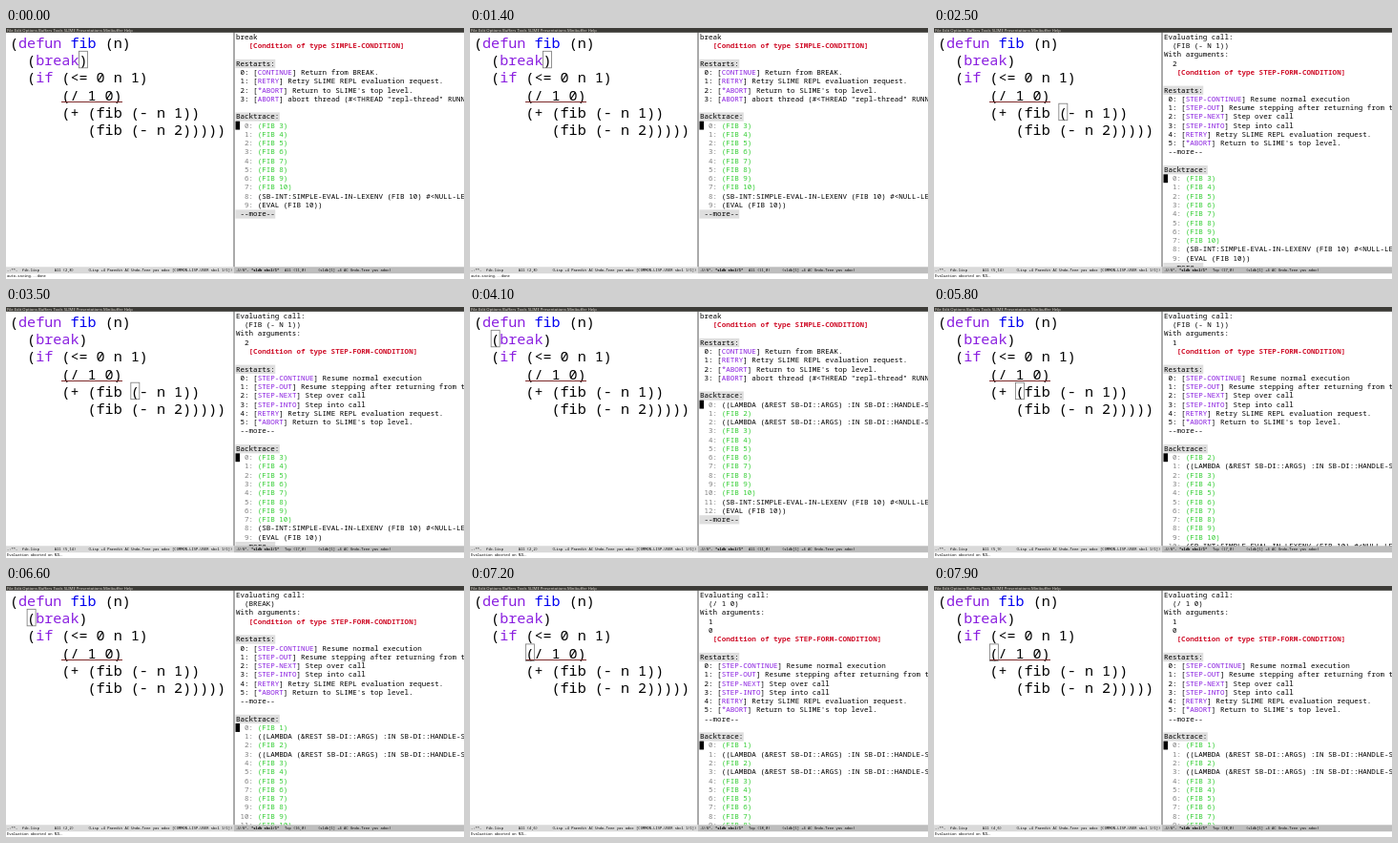
Write an HTML page that moves like this. It is 480 by 263 pixels and loops after 8000 ms.

```html
<!DOCTYPE html>
<html lang="en">
<head>
<meta charset="utf-8">
<title>Stepping through fib</title>
<style>
  html, body { margin: 0; width: 100%; height: 100%; overflow: hidden; background: #fff; }
  svg { display: block; width: 100%; height: 100%; }
  text { font-family: "Noto Sans Mono", "DejaVu Sans Mono", monospace; white-space: pre; fill: #000; }
  .code { font-size: 15.1px; }
  .debug { font-size: 7.55px; }
  .tiny { font-size: 3.78px; }
  .menu { font-family: "Noto Sans", sans-serif; font-size: 4.2px; fill: #dfdbd2; }
  .key { fill: #8a1fe0; }
  .name { fill: #0000f0; }
  .error { fill: #d0102a; font-weight: bold; }
  .num { fill: #7f7f7f; }
  .call { fill: #32cd32; }
</style>
</head>
<body>
<svg id="stage" viewBox="0 0 480 263" preserveAspectRatio="none"></svg>
<script>
const stage = document.getElementById('stage');
const CODE_W = 9.06, CODE_H = 18.3, ROW_H = 9.27, TOP = 5, SPLIT = 240.5;

const esc = s => s.replace(/&/g, '&amp;').replace(/</g, '&lt;');
const span = (cls, s) => `<tspan class="${cls}">${esc(s)}</tspan>`;
const text = (cls, x, y, html) => `<text class="${cls}" x="${x}" y="${y}">${html}</text>`;
const rect = (x, y, w, h, fill) => `<rect x="${x}" y="${y}" width="${w}" height="${h}" fill="${fill}"/>`;

const code = [
  '(' + span('key', 'defun') + ' ' + span('name', 'fib') + ' (n)',
  '  (' + span('key', 'break') + ')',
  '  (' + span('key', 'if') + esc(' (<= 0 n 1)'),
  '      (/ 1 0)',
  '      (+ (fib (- n 1))',
  '         (fib (- n 2)))))'
];

const breakRestarts = [
  ['CONTINUE', 'Return from BREAK.'],
  ['RETRY', 'Retry SLIME REPL evaluation request.'],
  ['*ABORT', "Return to SLIME's top level."],
  ['ABORT', 'abort thread (#<THREAD "repl-thread" RUNNING']
];
const stepRestarts = [
  ['STEP-CONTINUE', 'Resume normal execution'],
  ['STEP-OUT', 'Resume stepping after returning from this'],
  ['STEP-NEXT', 'Step over call'],
  ['STEP-INTO', 'Step into call'],
  ['RETRY', 'Retry SLIME REPL evaluation request.'],
  ['*ABORT', "Return to SLIME's top level."]
];

const LAMBDA = '((LAMBDA (&REST SB-DI::ARGS) :IN SB-DI::HANDLE-SINGLE';
const fibs = Array.from({ length: 8 }, (_, i) => `(FIB ${i + 3})`);
const outer = [...fibs, '(SB-INT:SIMPLE-EVAL-IN-LEXENV (FIB 10) #<NULL-LEXENV', '(EVAL (FIB 10))'];
const inFib2 = ['(FIB 2)', LAMBDA, ...outer];
const inFib1 = ['(FIB 1)', LAMBDA, ...inFib2];

// at: line and column of the cursor; no call while stopped at the break form
const scenes = [
  { from: 0, at: [2, 8], stack: outer, note: 'auto-saving...done' },
  { from: 2500, at: [5, 14], call: '(FIB (- N 1))', args: [2], stack: outer },
  { from: 4100, at: [2, 2], stack: [LAMBDA, ...inFib2] },
  { from: 5300, at: [5, 9], call: '(FIB (- N 1))', args: [1], stack: inFib2 },
  { from: 6200, at: [2, 2], call: '(BREAK)', args: [], stack: inFib1 },
  { from: 7200, at: [4, 6], call: '(/ 1 0)', args: [1, 0], stack: inFib1 }
];

function debuggerPane({ call, args, stack }) {
  const rows = [], marks = [];
  const condition = type => span('error', `   [Condition of type ${type}]`);
  const mark = s => { marks.push([rows.length, s.length]); rows.push(s); };

  if (call) {
    rows.push('Evaluating call:', '  ' + esc(call), 'With arguments:',
      ...args.map(a => '  ' + a), condition('STEP-FORM-CONDITION'));
  } else {
    rows.push('break', condition('SIMPLE-CONDITION'));
  }
  rows.push('');
  mark('Restarts:');
  (call ? stepRestarts : breakRestarts).forEach(([name, about], i) =>
    rows.push(` ${i}: [${span('key', name)}] ${esc(about)}`));
  if (call) rows.push(' --more--');
  rows.push('');
  mark('Backtrace:');
  const point = rows.length;
  stack.forEach((s, i) => rows.push(
    span('num', String(i).padStart(3) + ':') + ' ' + span(s.startsWith('(FIB') ? 'call' : '', s)));
  mark(' --more--');

  const top = n => TOP + n * ROW_H;
  const svg = marks.map(([n, len]) => rect(SPLIT, top(n), len * 4.53 + 1, ROW_H, '#dedede')).join('')
    + rows.slice(0, 27).map((r, n) => text('debug', 241, top(n) + 6.9, r)).join('')
    + rect(SPLIT, top(point), 4.6, ROW_H - .4, '#000');
  return { svg, line: point + 1, fits: rows.length < 27 };
}

function draw(scene) {
  const pane = debuggerPane(scene);
  const [line, col] = scene.at;
  const underY = TOP + 4 * CODE_H - 1.2;
  stage.innerHTML =
    rect(0, 0, 480, 263, '#fff')
    + code.map((c, i) => text('code', 4, 20.7 + i * CODE_H, c)).join('')
    + rect(58, underY, 64, 1, '#7c2929')
    + `<rect x="${4 + col * CODE_W}" y="${TOP + (line - 1) * CODE_H + 1}" width="9" height="17.5" fill="none" stroke="#777" stroke-width=".8"/>`
    + pane.svg
    + rect(238, 4.5, 2, 246, '#aaa')
    + rect(0, 0, 480, 4.8, '#3c3b37')
    + text('menu', 1, 3.8, 'File Edit Options Buffers Tools SLIME Presentations Minibuffer Help')
    + rect(0, 250.3, 239, 7.2, '#d9d9d9')
    + rect(239, 250.3, 241, 7.2, '#bdbdbd')
    + text('tiny', 1, 255.4, `-:**-  fib.lisp       All (${line},${col})`)
    + text('tiny', 86, 255.4, '(Lisp +4 Paredit AC Undo-Tree yas adoc [COMMON-LISP-USER sbcl 1/1])')
    + text('tiny', 241, 255.4, '-U:%*-')
    + `<g font-weight="bold">${text('tiny', 257, 255.4, '*sldb sbcl/1*')}</g>`
    + text('tiny', 292, 255.4, `${pane.fits ? 'All' : 'Top'} (${pane.line},0)`)
    + text('tiny', 327, 255.4, '(sldb[1] +4 AC Undo-Tree yas adoc)')
    + rect(0, 257.5, 480, 5.5, '#fff')
    + text('tiny', 1, 261.4, scene.note || 'Evaluation aborted on NIL.');
}

let shown;
function tick() {
  const t = performance.now() % 8000;
  const scene = scenes.findLast(s => s.from <= t);
  if (scene !== shown) draw(shown = scene);
  requestAnimationFrame(tick);
}
tick();
</script>
</body>
</html>
```
